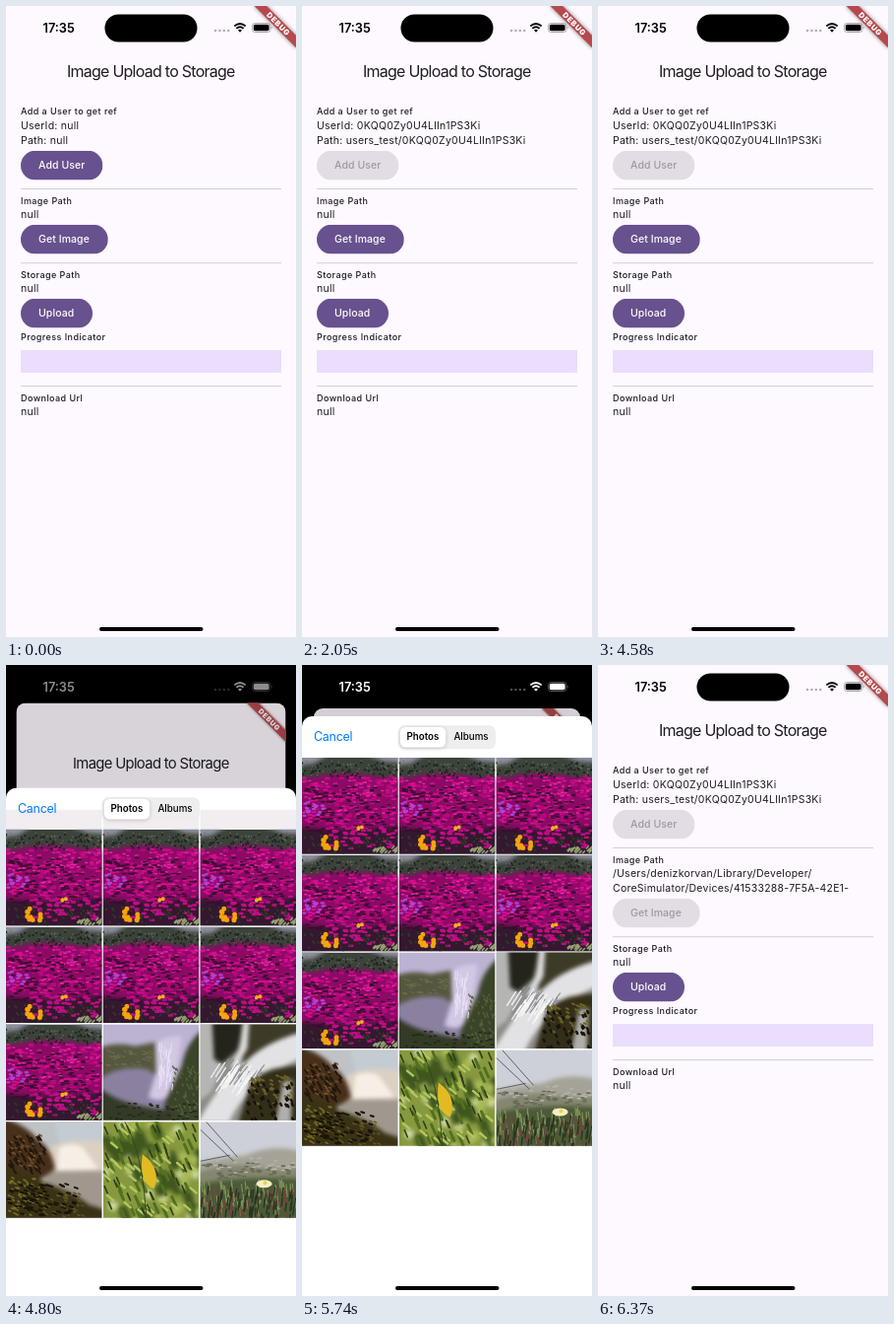
Write an HTML page that moves like this. It is 295 px wide and 640 px high and loops after 8 s.

```html
<!DOCTYPE html>
<html lang="en">
<head>
<meta charset="utf-8">
<title>Image Upload to Storage</title>
<style>
  html, body { margin: 0; height: 100%; overflow: hidden; background: #000; }
  svg { display: block; width: 100vw; height: 100vh; }
  text { font: 10.5px Inter, "Open Sans", sans-serif; letter-spacing: .25px; fill: #1d1b20; }
  text.label { font-size: 9px; font-weight: 500; letter-spacing: .43px; }
  text.button { font-weight: 500; letter-spacing: .075px; }
  text.title { font-size: 16px; letter-spacing: -.74px; text-anchor: middle; }
  text.clock { font-size: 12.75px; font-weight: 600; letter-spacing: 0; fill: currentColor; }
  text.debug { font-size: 7.65px; font-weight: 900; letter-spacing: .75px; text-anchor: middle; fill: #fff; }
  text.cancel { font-size: 12.5px; letter-spacing: -.3px; fill: #007aff; }
  text.tab { font-size: 9.75px; font-weight: 500; letter-spacing: 0; text-anchor: middle; fill: #000; }
  .banner { fill: #b5494d; filter: drop-shadow(0 0 2px #0007); }
  .knob { fill: #fff; filter: drop-shadow(0 1px 2px #0003); }
  .strokes { fill: none; stroke-linecap: round; }
  .soft { filter: blur(2px); }
  .fine { filter: blur(.5px); }
</style>
</head>
<body>
<svg id="stage" viewBox="0 0 295 640" preserveAspectRatio="none"></svg>
<script>
const LOOP = 8000;
const USER_ID = "0KQQ0Zy0U4LlIn1PS3Ki";
const $ = id => document.getElementById(id);
const clamp = v => Math.max(0, Math.min(1, v));
const ramp = (t, start, length) => clamp((t - start) / length);

// ---- markup helpers ----
let seed = 11;
const rnd = () => (seed = seed * 16807 % 2147483647) / 2147483647;

const rect = (x, y, w, h, fill, rx = 0) =>
  `<rect x="${x}" y="${y}" width="${w}" height="${h}" rx="${rx}" fill="${fill}"/>`;
const shape = (d, fill) => `<path d="${d}" fill="${fill}"/>`;
const text = (x, y, str, cls = "", id = "") =>
  `<text x="${x}" y="${y}" class="${cls}" id="${id}">${str}</text>`;
const label = (y, str) => text(15, y, str, "label");
const divider = y => rect(15, y, 265, .75, "#c6c0cb");

// n short strokes scattered over a box, each running by (dx, dy)
function strokes(color, size, n, x, y, w, h, dx = .01, dy = 0) {
  let d = "";
  while (n--) d += `M${(x + rnd() * w).toFixed(1)} ${(y + rnd() * h).toFixed(1)}l${dx} ${dy}`;
  return `<path class="strokes" d="${d}" stroke="${color}" stroke-width="${size}"/>`;
}

const button = (id, y, w, str) => `
  <clipPath id="${id}Clip"><rect x="15" y="${y}" width="${w}" height="29.7" rx="14.85"/></clipPath>
  <g clip-path="url(#${id}Clip)">
    <rect id="${id}Back" x="15" y="${y}" width="${w}" height="29.7" fill="#67518e"/>
    <circle id="${id}Ink" cx="${15 + w / 2}" cy="${y + 15}" r="0" fill="#fff" opacity="0"/>
  </g>
  <text id="${id}Text" class="button" x="33" y="${y + 18.6}" style="fill:#fff">${str}</text>`;

// ---- photos, each 97.4 square: base colour, soft masses, fine texture ----
const photo = (base, masses, texture) =>
  rect(0, 0, 98, 98, base) + `<g class="soft">${masses}</g><g class="fine">${texture}</g>`;

const photos = {
  flowers: () => photo("#3b433a",
    shape("M-5 -5H30L12 6L-5 8ZM60 -5H103V5L84 4Z", "#8d8f9c") +
    shape("M-5 24Q30 13 60 17T103 22V78H-5Z", "#8c0a66") +
    shape("M-5 70Q50 76 103 68V103H-5Z", "#34182f"),
    strokes("#67715f", 1.4, 60, 0, 3, 98, 15) + strokes("#1c231c", 2.2, 60, 0, 5, 98, 15) +
    strokes("#d20f8e", 2, 130, 0, 20, 96, 48, 3) + strokes("#b8077c", 2.4, 70, 0, 19, 96, 54, 3) +
    strokes("#e32ba4", 1.4, 60, 0, 22, 96, 40, 2) +
    strokes("#3a0c30", 1.7, 120, 0, 28, 96, 50, 3) +
    strokes("#c20c86", 2.4, 55, 28, 68, 68, 24, 3) + strokes("#2b3a26", 2.4, 50, 0, 78, 98, 20) +
    strokes("#a548d8", 2.2, 16, 1, 44, 22, 16, 2) +
    strokes("#f7a30c", 5, 10, 20, 80, 16, 12) + strokes("#f2b01e", 4, 3, 57, 70, 4, 3) +
    strokes("#93a070", 1.6, 20, 72, 92, 25, 5, 2, -2)),
  valley: () => photo("#bcb2d2",
    shape("M-5 24Q14 17 32 22L54 18L58 70L-5 60Z", "#56573f") +
    shape("M-5 56Q20 40 46 46L72 66L62 86L-5 76Z", "#8b80a0") +
    shape("M53 19Q62 12 80 12L72 66Q62 82 46 74L54 48Z", "#d2c8e4") +
    shape("M103 4Q84 18 80 42L64 76L58 103H103Z", "#3a4429") +
    shape("M-5 64Q14 78 36 82T70 88V103H-5Z", "#333b27"),
    strokes("#e8e0f6", 1, 36, 56, 18, 15, 40, -1, 9) +
    strokes("#6b6a4a", 1.2, 40, 2, 26, 46, 20, 3, 1) +
    strokes("#56623a", 1.3, 60, 70, 42, 27, 52, 1, 2) +
    strokes("#20281a", 1.5, 50, 4, 80, 90, 17, 2)),
  rapids: () => photo("#8d8c88",
    shape("M34 -5H103V18L62 28L44 40Z", "#3d3a27") +
    shape("M12 -5H42L38 26L22 40L12 34Z", "#24241b") +
    shape("M-5 -5H12L14 36L26 42L10 70L-5 80Z", "#b5b5b4") +
    shape("M103 8Q66 18 46 38Q22 56 -5 103H28Q44 60 103 34Z", "#e2e2e4") +
    shape("M103 42Q62 42 50 62L38 103H103Z", "#332e18") +
    shape("M44 -5L50 -5L48 24L38 42L30 44L40 24Z", "#dededf") +
    shape("M84 58L94 56L92 103H76Z", "#b0afac"),
    strokes("#8f9094", 1.2, 24, 24, 34, 42, 18, -9, 11) + strokes("#f6f6f7", 1.2, 26, 16, 36, 44, 22, -9, 14) +
    strokes("#6a6224", 2, 40, 52, 50, 42, 30, 2, 1) + strokes("#16140d", 2.4, 40, 46, 58, 48, 38, 1, 2)),
  cove: () => photo("#bfc3c6",
    shape("M48 -5H103V30H56Z", "#c3ccd2") +
    shape("M44 26Q72 14 103 22V50H48Z", "#dcd0c2") +
    shape("M54 26Q66 20 78 26L94 48L52 50Z", "#f6efe6") +
    shape("M40 50H103V90H40Z", "#a0988e") +
    shape("M-5 -5Q22 4 32 18Q46 26 50 48L30 62L-5 66Z", "#47301a") +
    shape("M-5 46Q18 48 40 62Q70 72 84 84L103 90V103H-5Z", "#3a3215"),
    strokes("#22170c", 2, 60, 2, 14, 36, 36, 2, 3) + strokes("#75522c", 1.4, 30, 4, 12, 32, 34, 2, 1) +
    strokes("#766c28", 1.6, 60, 2, 56, 36, 38, 2, 1) + strokes("#5f5522", 1.6, 40, 34, 70, 44, 26, 2, 1) +
    strokes("#181509", 2, 70, 0, 62, 70, 34, 3, 1)),
  leaf: () => photo("#87993f",
    strokes("#cbd79c", 10, 14, 0, 0, 98, 98) + strokes("#40561f", 10, 22, 0, 0, 98, 98, 4, 10) +
    strokes("#a9b957", 10, 16, 30, 0, 68, 98),
    strokes("#52701f", 3, 40, 0, 0, 92, 90, 4, 9) + strokes("#b4c75e", 2.4, 34, 0, 0, 92, 92, 6, 5) +
    strokes("#2c3e14", 1.6, 34, 0, 0, 92, 90, 3, 7) +
    shape("M40 33Q59 46 52 68Q36 62 40 33Z", "#e2bb22") +
    `<path d="M22 0Q40 30 44 98" fill="none" stroke="#2f4a1a"/>`),
  meadow: () => photo("#cdd0d8",
    shape("M-5 42Q20 36 46 34Q74 22 103 30V70H-5Z", "#a5a398") +
    shape("M-5 52Q30 40 60 46T103 44V64H-5Z", "#84866f") +
    shape("M-5 64Q40 54 103 58V103H-5Z", "#4c5a37"),
    strokes("#676b56", 1.6, 50, 2, 42, 92, 16, 3) + strokes("#b9b5a4", 1.4, 30, 10, 36, 84, 16, 3) +
    strokes("#82965a", 1.1, 80, 0, 58, 98, 32, 1, 8) + strokes("#74403c", 1.4, 50, 0, 66, 98, 28, 1, 7) +
    strokes("#26351f", 1.4, 80, 0, 64, 98, 32, -1, 8) +
    `<path d="M0 8L34 40M6 0L38 36M0 40L30 34" fill="none" stroke="#44464a" stroke-width=".8"/>` +
    `<ellipse cx="65" cy="63" rx="8" ry="4" fill="#f4efc4"/><circle cx="66" cy="62" r="2" fill="#e8d44e"/>`)
};
const others = ["valley", "rapids", "cove", "leaf", "meadow"];
const cell = i => `x="${i % 3 * 98.8}" y="${42 + Math.floor(i / 3) * 98.8}"`;

const photoDefs = Object.entries(photos).map(([name, make]) =>
  `<symbol id="${name}" width="97.4" height="97.4" viewBox="0 0 97.4 97.4">${make()}</symbol>`).join("");
const grid = Array.from({ length: 12 }, (_, i) =>
  `<use href="#${i < 7 ? "flowers" : others[i - 7]}" ${cell(i)}/>`).join("");

// ---- screen ----
const page = rect(0, 0, 295, 640, "#fef8ff") +
  text(147.3, 71.8, "Image Upload to Storage", "title") +
  label(110.4, "Add a User to get ref") +
  text(15, 124.9, "", "", "userId") +
  text(15, 139.9, "", "", "userPath") +
  button("add", 146.8, 83.4, "Add User") +
  divider(185) +
  label(200.6, "Image Path") +
  text(15, 215, "", "", "image1") +
  text(15, 230, "", "", "image2") +
  `<g id="tail">` +
    button("get", 221.8, 88.8, "Get Image") +
    divider(260.4) +
    label(275.6, "Storage Path") +
    text(15, 290, "null") +
    button("upload", 296.8, 73, "Upload") +
    label(339, "Progress Indicator") +
    rect(15, 349, 265, 23, "#eaddfd") +
    divider(385) +
    label(400.5, "Download Url") +
    text(15, 414.9, "null") +
  `</g>
  <g transform="translate(295) rotate(45)">
    <rect class="banner" x="-30" y="21" width="60" height="9"/>
    ${text(.3, 28.3, "DEBUG", "debug")}
  </g>`;

const sheet = rect(0, 0, 295, 700, "#fff", 10) +
  `<g id="veil">${[0, 1, 2].map(i => rect(i * 98.8, 22, 97.4, 20, "#f1edf1")).join("")}</g>` +
  grid +
  text(12, 25, "Cancel", "cancel") +
  rect(98, 9.3, 99, 24, "#eeeeef", 6.5) +
  `<rect class="knob" x="99.8" y="11" width="46.4" height="20.6" rx="5.5"/>` +
  `<text class="tab" x="123" y="24.4" style="font-weight:600">Photos</text>` +
  text(172, 24.4, "Albums", "tab");

const statusBar = text(37.5, 26.6, "17:35", "clock") +
  [213, 217.4, 221.8, 226.2].map(x =>
    `<circle cx="${x}" cy="25" r="1.3" fill="currentColor" opacity=".3"/>`).join("") +
  `<g fill="none" stroke="currentColor" stroke-width="1.9">
    <path d="M232.3 20.4Q238 15.4 243.7 20.4M234.4 22.8Q238 19.6 241.6 22.8"/>
  </g>
  <path d="M236 24.5Q238 23 240 24.5L238 26.7Z" fill="currentColor"/>
  <rect x="250.5" y="17.5" width="18.4" height="9" rx="2.8" fill="none" stroke="currentColor" stroke-width=".8" opacity=".4"/>
  <rect x="251.8" y="18.8" width="15.8" height="6.4" rx="1.7" fill="currentColor"/>
  <path d="M269.9 20.5q1.6 1.5 0 3z" fill="currentColor" opacity=".45"/>`;

$("stage").innerHTML = `
  <defs>${photoDefs}
    <clipPath id="cardClip"><rect id="cardShape" width="295" height="640"/></clipPath>
  </defs>
  ${rect(0, 0, 295, 640, "#000")}
  <g id="card" clip-path="url(#cardClip)">${page}
    <rect id="dim" width="295" height="640"/>
  </g>
  <g id="sheet">${sheet}</g>
  ${rect(100.5, 8.5, 94, 28, "#000", 14)}
  <g id="status">${statusBar}</g>
  ${rect(95, 630, 105.5, 4, "#000", 2)}`;

// ---- motion ----
// The screen refreshes in bursts: start, end, number of intervals.
const bursts = [[500, 1160, 6], [1500, 2050, 5], [3600, 4380, 7], [4480, 5120, 6], [5740, 6370, 6]];

function sample(t) {
  let held = 0;
  for (const [a, b, n] of bursts) {
    const step = (b - a) / n;
    if (t >= a) held = Math.min(b, a + Math.floor((t - a + 10) / step) * step);
  }
  return held;
}

// Critically damped spring from 0 to 1
function spring(t, start) {
  const x = Math.max(0, t - start) * .018;
  return 1 - (1 + x) * Math.exp(-x);
}

const mix = (a, b, k) => `rgb(${a.map((v, i) => Math.round(v + (b[i] - v) * k))})`;

function ink(id, t, press, release) {
  const grow = 1 - (1 - ramp(t, press, 300)) ** 2;
  $(id + "Ink").setAttribute("r", 8 + 42 * grow);
  $(id + "Ink").setAttribute("opacity", .14 * ramp(t, press, 75) * (1 - ramp(t, release, 375)));
}

// The label greys first, the background follows.
function disable(id, t, start) {
  $(id + "Text").style.fill = mix([255, 255, 255], [158, 152, 160], ramp(t, start, 200));
  $(id + "Back").setAttribute("fill", mix([103, 81, 142], [226, 220, 228], ramp(t, start + 200, 200)));
}

function draw(t) {
  const hasUser = t >= 1500, hasImage = t >= 5940;
  $("userId").textContent = "UserId: " + (hasUser ? USER_ID : "null");
  $("userPath").textContent = "Path: " + (hasUser ? "users_test/" + USER_ID : "null");
  $("image1").textContent = hasImage ? "/Users/denizkorvan/Library/Developer/" : "null";
  $("image2").textContent = hasImage ? "CoreSimulator/Devices/41533288-7F5A-42E1-" : "";
  $("tail").setAttribute("transform", `translate(0 ${hasImage ? 15 : 0})`);

  ink("add", t, 460, 700);
  ink("get", t, 3560, 3930);
  disable("add", t, 1500);
  disable("get", t, 5940);

  let p = spring(t, 4599) - spring(t, 5790);
  if (t >= 6370 || p < .001) p = 0;
  const s = 1 - .081 * p;
  $("card").setAttribute("transform", `translate(${147.5 * (1 - s)} ${44 * p}) scale(${s})`);
  $("cardShape").setAttribute("rx", 10 * clamp(p * 3));
  $("dim").setAttribute("opacity", .17 * p);
  $("sheet").setAttribute("transform", `translate(0 ${640 - 588 * p})`);
  $("sheet").setAttribute("visibility", p ? "visible" : "hidden");
  $("veil").setAttribute("opacity", p < .98 ? 1 : 0);

  const glow = ramp(t, 4690, 200) - ramp(t, 5850, 200);
  $("status").style.color = mix([0, 0, 0], [255, 255, 255], glow);
}

function frame() {
  draw(sample(performance.now() % LOOP));
  requestAnimationFrame(frame);
}
frame();
</script>
</body>
</html>
```
